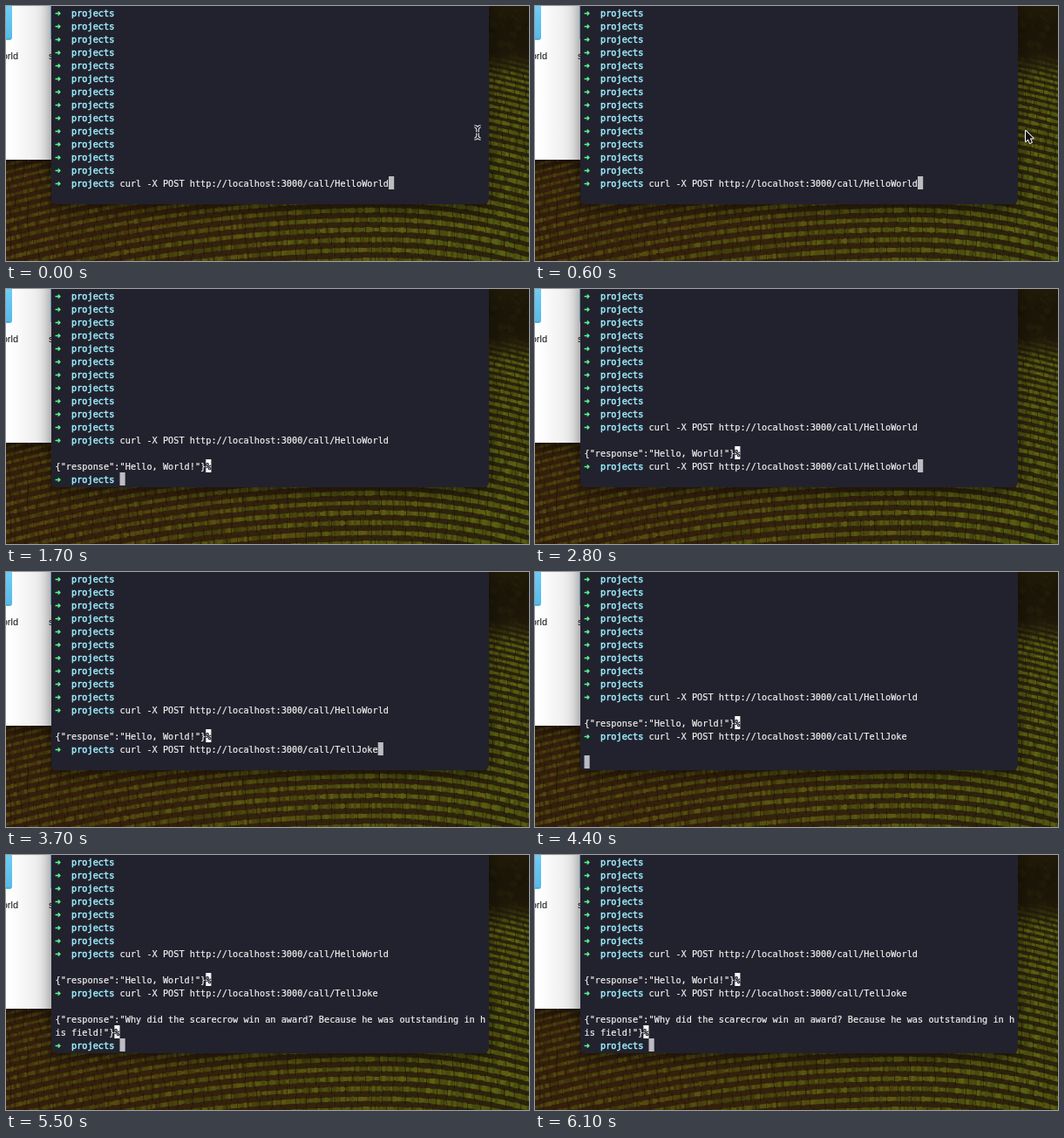
Recreate the animation shown at these times as an HTML page with a canvas. Size 600 by 292 pixels, loop 7500 ms.

```html
<!DOCTYPE html>
<html lang="en">
<head>
<meta charset="utf-8">
<title>Terminal</title>
<style>
  html, body { margin: 0; width: 100%; height: 100%; overflow: hidden; background: #21190d; }
  canvas { display: block; }
</style>
</head>
<body>
<canvas id="stage" width="600" height="292"></canvas>
<script>
const W = 600, H = 292, LOOP = 7500;
const ROW = 15, COL = 6.17, LEFT = 56.5;
const ctx = document.getElementById('stage').getContext('2d');

// Terminal contents: '$' starts a prompt line, '|' is the cursor, '~' the inverse percent sign
const call = 'curl -X POST http://localhost:3000/call/';
const hello = ['$' + call + 'HelloWorld', ''];
const greeted = [...hello, '{"response":"Hello, World!"}~'];
const joke = [...greeted, '$' + call + 'TellJoke', ''];
const told = [...joke,
  '{"response":"Why did the scarecrow win an award? Because he was outstanding in h',
  'is field!"}~'];

// [start time, row of the last line, lines]
const states = [
  [0, 13, ['$' + call + 'HelloWorld|']],
  [1000, 14, [...hello, '|']],
  [1200, 14, [...greeted, '$|']],
  [2800, 13, [...greeted, '$' + call + 'HelloWorld|']],
  [2900, 13, [...greeted, '$' + call + 'TellJoke|']],
  [4400, 14, [...joke, '|']],
  [5100, 14, [...told, '$|']]
];

function seeded(seed) {
  return () => (seed = (seed * 16807) % 2147483647) / 2147483647;
}

function rect(g, color, x, y, w, h) {
  g.fillStyle = color;
  g.fillRect(x, y, w, h);
}

function gradient(g, x0, y0, x1, y1, ...colors) {
  const fill = g.createLinearGradient(x0, y0, x1, y1);
  colors.forEach((c, i) => fill.addColorStop(i / (colors.length - 1), c));
  return fill;
}

// Height of a vine row relative to its crest
function slope(x) {
  const d = x - 430;
  return d * d * (d < 0 ? 0.0003 : 0.0008);
}

function drawVineyard(g) {
  const rnd = seeded(77);
  rect(g, gradient(g, 0, 0, W, 0, '#351e0b', '#33220d', '#2b230c'), 0, 0, W, H);

  for (let y = 40, gap = 6; y < H; y += gap, gap += 0.22) {
    for (let x = 0; x < W; x += 3) {
      const side = x / W;
      const hue = 44 + side * 16 + rnd() * 12;
      const light = 13 + side * 5 + rnd() * 8;
      g.strokeStyle = `hsla(${hue}, 68%, ${light}%, .85)`;
      g.lineWidth = gap * (0.28 + side * 0.1 + rnd() * 0.2);
      g.beginPath();
      g.moveTo(x, y + slope(x));
      g.lineTo(x + 3.5, y + slope(x + 3.5));
      g.stroke();
    }
    g.strokeStyle = 'rgba(24,13,4,.55)';
    g.lineWidth = 1;
    for (let x = rnd() * 12; x < W; x += 9 + rnd() * 8) {
      const top = y + slope(x) - gap * 0.5;
      g.beginPath();
      g.moveTo(x, top);
      g.lineTo(x + rnd() * 3 - 1, top + gap);
      g.stroke();
    }
  }

  // Dark trees above the field
  rect(g, gradient(g, 0, 0, 0, 84, '#211a09', '#1b1507', '#1f1809', 'rgba(31,24,9,0)'),
    540, 0, 60, 84);
  for (let i = 0; i < 90; i++) {
    g.fillStyle = `hsla(${38 + rnd() * 12}, 55%, ${5 + rnd() * 9}%, .25)`;
    g.beginPath();
    g.arc(550 + rnd() * 52, rnd() * 66, 1 + rnd() * 4, 0, 7);
    g.fill();
  }
}

function drawFinder(g) {
  g.save();
  g.shadowColor = 'rgba(0,0,0,.6)';
  g.shadowBlur = 14;
  g.shadowOffsetY = 4;
  rect(g, '#fff', -20, -20, 100, 196);
  g.restore();

  g.fillStyle = gradient(g, 0, 0, 0, 39, '#6fcdf5', '#55b9e8');
  g.beginPath();
  g.roundRect(-40, -10, 47, 49, 3);
  g.fill();
  rect(g, '#4aa5d2', 0, 37, 5, 1);
  rect(g, '#8fcdea', 51, -10, 10, 48);

  g.fillStyle = '#111';
  g.font = '11px "Liberation Sans", Arial, sans-serif';
  g.textAlign = 'right';
  g.fillText('HelloWorld', 14, 61);
  g.textAlign = 'left';
  g.fillText('s', 49, 61);

  rect(g, gradient(g, 4, 0, 52, 0, 'rgba(0,0,20,0)', 'rgba(0,0,20,.1)'), 4, 0, 48, 176);
}

function drawWindow(g) {
  g.shadowColor = 'rgba(0,0,0,.45)';
  g.shadowBlur = 18;
  g.shadowOffsetY = 5;
  g.fillStyle = '#22222e';
  g.beginPath();
  g.roundRect(52, -20, 502, 247, 6);
  g.fill();
}

const backdrop = document.createElement('canvas');
backdrop.width = W;
backdrop.height = H;
const back = backdrop.getContext('2d');
[drawVineyard, drawFinder, drawWindow].forEach(draw => draw(back));

// A thin outline gives the terminal type its weight
function drawText(text, col, row, color, weight = 0.2) {
  ctx.fillStyle = ctx.strokeStyle = color;
  ctx.lineWidth = weight;
  ctx.lineJoin = 'round';
  ctx.font = '10.25px "DejaVu Sans Mono", monospace';
  [...text].forEach((ch, i) => {
    const x = LEFT + (col + i) * COL, y = row * ROW + 11.5;
    ctx.fillText(ch, x, y);
    ctx.strokeText(ch, x, y);
  });
}

function drawLine(line, row) {
  let col = 0;
  if (line[0] === '$') {
    drawText('➜', 0, row, '#5af78e', 0.7);
    drawText('projects', 3, row, '#9aedfe', 0.5);
    line = line.slice(1);
    col = 12;
  }
  const mark = line.slice(-1);
  const marked = mark === '|' || mark === '~';
  const text = marked ? line.slice(0, -1) : line;
  drawText(text, col, row, '#f1f1f0');
  if (!marked) return;

  const end = col + text.length;
  rect(ctx, mark === '|' ? '#bcbcc2' : '#f4f4f4', LEFT + end * COL, row * ROW, COL, ROW);
  if (mark === '~') drawText('%', end, row, '#22222e', 0.5);
}

function drawTerminal(t) {
  const [, last, lines] = states.filter(s => s[0] <= t).pop();
  const first = last - lines.length + 1;
  for (let row = 0; row < first; row++) drawLine('$', row);
  lines.forEach((line, i) => drawLine(line, first + i));
}

function drawBeam(x, y) {
  const beam = new Path2D(`M${x - 3.5} ${y - 7}q3.5 0 3.5 4q0-4 3.5-4M${x} ${y - 4}v8
    M${x - 3.5} ${y + 7}q3.5 0 3.5-4q0 4 3.5 4M${x - 2} ${y}h4`);
  [['#e4e4e4', 3.4], ['#22222a', 1.3]].forEach(([color, width]) => {
    ctx.strokeStyle = color;
    ctx.lineWidth = width;
    ctx.stroke(beam);
  });
}

function drawArrow(x, y) {
  const arrow = new Path2D(`M${x} ${y - 7}v12l2.8-2.6 2 4.5 2-.9-2-4.4h3.8z`);
  ctx.lineJoin = 'round';
  ctx.strokeStyle = '#fff';
  ctx.lineWidth = 2;
  ctx.stroke(arrow);
  ctx.fillStyle = '#111';
  ctx.fill(arrow);
}

function drawMouse(t) {
  if (t >= 1200) return;
  const step = Math.min(3, Math.floor(t / 100)) / 3;
  const x = 541 + 22 * step, y = 145 + 5 * step;
  (x < 554 ? drawBeam : drawArrow)(x, y);
}

const start = performance.now();

function frame(now) {
  const t = Math.max(0, now - start) % LOOP;
  ctx.drawImage(backdrop, 0, 0);
  drawTerminal(t);
  drawMouse(t);
  requestAnimationFrame(frame);
}

requestAnimationFrame(frame);
</script>
</body>
</html>
```
